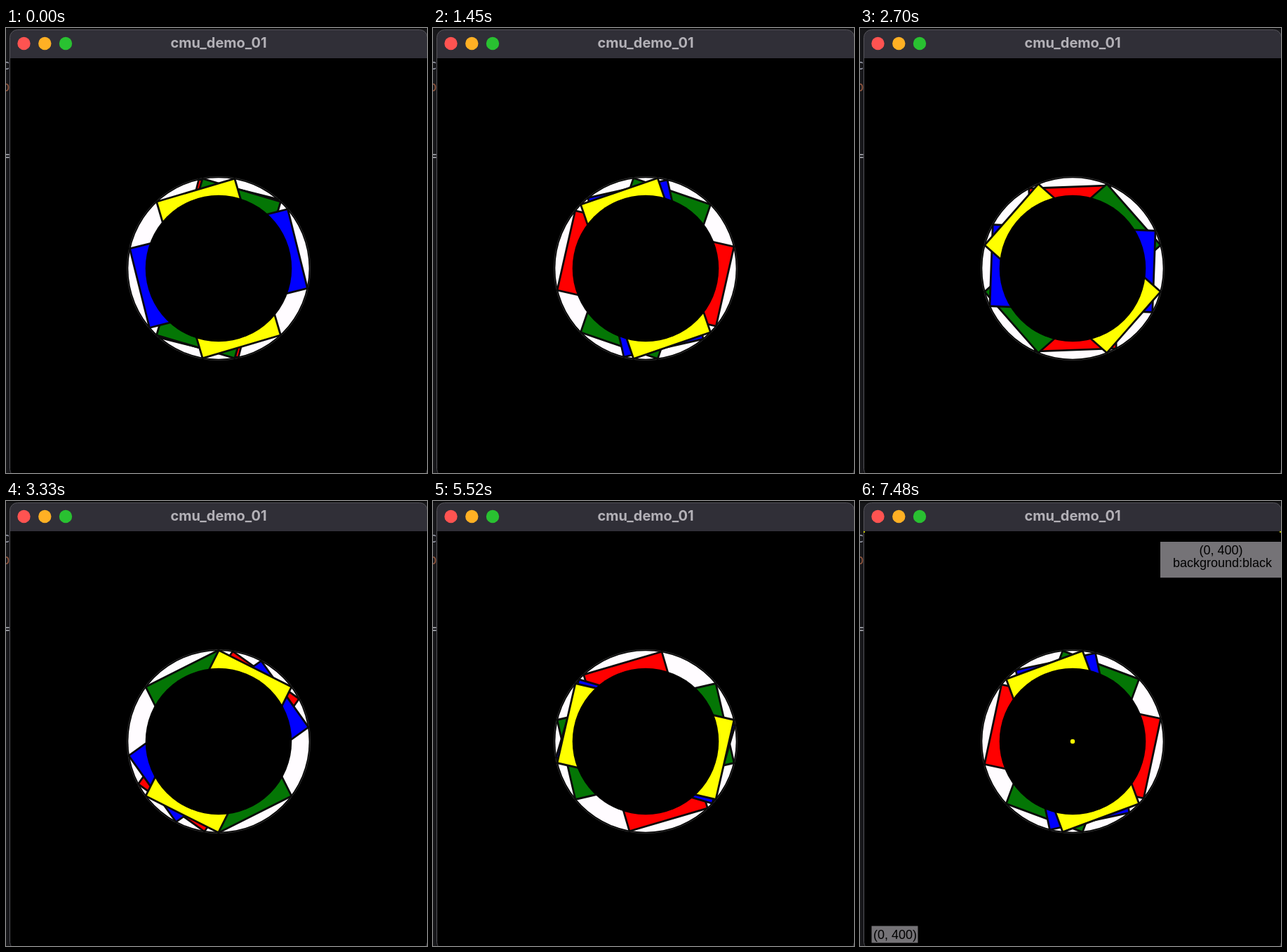
Recreate the animation shown at these times as an HTML page. Size 600x633 px, loop 7510 ms.

```html
<!DOCTYPE html>
<html lang="en">
<head>
<meta charset="utf-8">
<title>Rotating rectangles</title>
<style>
  html, body { margin: 0; width: 100%; height: 100%; overflow: hidden; background: #000; }
  svg { display: block; width: 600px; height: 633px; }
  .title { font: 700 20px Inter, sans-serif; fill: #b3b1b7; }
  .code { font: 19px "DejaVu Sans Mono", monospace; }
  .label { font: 18px "Liberation Sans", Arial, sans-serif; fill: #000; }
  .mid { text-anchor: middle; }
</style>
</head>
<body>
<svg viewBox="0 0 600 633">
  <defs>
    <clipPath id="edge"><rect width="5" height="633"/></clipPath>
    <clipPath id="win"><rect x="5.5" y="2.5" width="595" height="640" rx="11"/></clipPath>
  </defs>

  <!-- editor behind the window -->
  <rect width="600" height="633" fill="#17171a"/>
  <rect width="600" height="2" fill="#0a0a0b"/>
  <g class="code" clip-path="url(#edge)">
    <text x="-6" y="59" fill="#a3a6b4">c</text>
    <text x="-6" y="90" fill="#93583f">b</text>
    <text x="-6" y="188" fill="#a9abb2">=</text>
  </g>

  <!-- window -->
  <g clip-path="url(#win)">
    <rect x="5" y="2" width="596" height="640"/>
    <rect x="5" y="2" width="596" height="41" fill="#302f37"/>
  </g>
  <rect x="5.5" y="2.5" width="595" height="636" rx="11" fill="none" stroke="#55545a"/>
  <circle cx="25.5" cy="22" r="9.2" fill="#ff5351"/>
  <circle cx="55.3" cy="22" r="9.2" fill="#ffb024"/>
  <circle cx="85" cy="22" r="9.2" fill="#29c131"/>
  <text class="title mid" x="303" y="28">cmu_demo_01</text>

  <!-- ring -->
  <g transform="translate(303 342)">
    <circle r="130.6" fill="#000" stroke="#333"/>
    <circle r="128.7" fill="#fffcff"/>
    <g id="bars" stroke="#0a0a0a" stroke-width="2.8"></g>
    <circle r="104.3"/>
  </g>

  <!-- inspector -->
  <g id="inspector" visibility="hidden">
    <circle cx="303" cy="342" r="3.2" fill="#ff0"/>
    <circle cx="6" cy="44" r="1" fill="#ff0"/>
    <circle cx="599" cy="44" r="1" fill="#ff0"/>
    <rect x="428" y="58" width="172" height="51" fill="#757377"/>
    <text class="label mid" x="514.5" y="76">(0, 400)</text>
    <text class="label mid" x="516.5" y="94">background:black</text>
    <rect x="16.5" y="604.5" width="66" height="24" fill="#757377"/>
    <text class="label mid" x="50" y="622.5">(0, 400)</text>
  </g>
</svg>
<script>
const LOOP = 7510, STEP = 30.28, INSPECT_FROM = 246;

// time in ms -> degrees turned by the fast pair
const TURN = [[0, 0], [820, 99.3], [2090, 256], [3330, 403], [4520, 540], [6480, 776], [7480, 896.2]];

// back to front: colour, start angle, speed relative to TURN
const BARS = [
  ['#f00', 14, 0.5],
  ['#047605', 16.4, -1],
  ['#00f', 76, -0.5],
  ['#ff0', -16.4, 1],
];

const group = document.getElementById('bars');
const inspector = document.getElementById('inspector');

const bars = BARS.map(([fill, start, rate]) => {
  const el = document.createElementNS('http://www.w3.org/2000/svg', 'rect');
  const box = { x: -58, y: -116, width: 116, height: 232, fill };
  for (const key in box) el.setAttribute(key, box[key]);
  group.append(el);
  return { el, start, rate };
});

function turnAt(t) {
  let i = 1;
  while (i < TURN.length - 1 && t > TURN[i][0]) i++;
  const [t0, a0] = TURN[i - 1], [t1, a1] = TURN[i];
  return a0 + (a1 - a0) * (t - t0) / (t1 - t0);
}

function draw(now) {
  const tick = Math.floor((now % LOOP + 5) / STEP);
  const turn = turnAt(tick * STEP);
  for (const { el, start, rate } of bars) {
    el.setAttribute('transform', `rotate(${start + rate * turn})`);
  }
  inspector.setAttribute('visibility', tick >= INSPECT_FROM ? 'visible' : 'hidden');
}

const begin = performance.now();
function loop() {
  draw(performance.now() - begin);
  requestAnimationFrame(loop);
}
loop();
</script>
</body>
</html>
```
